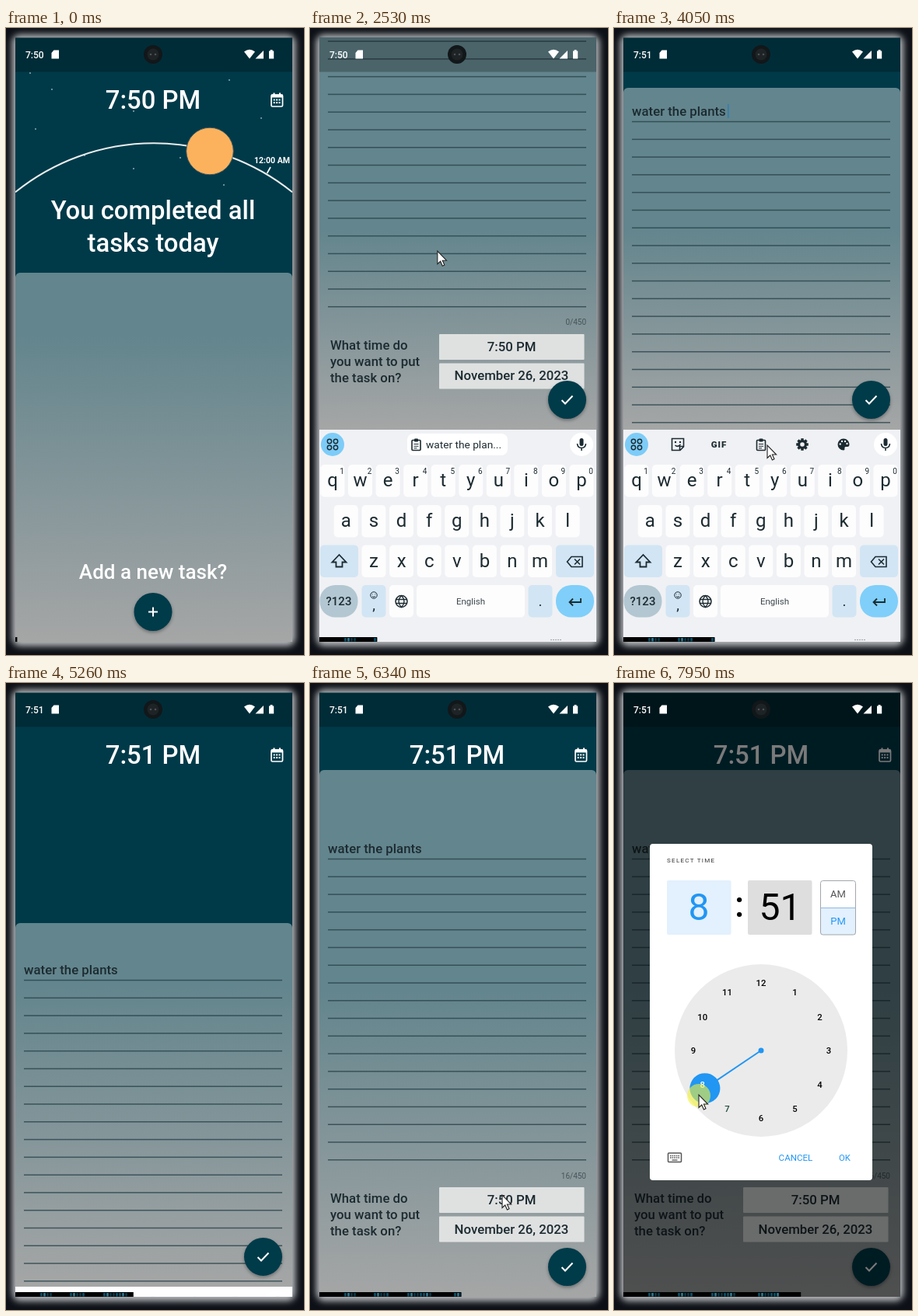
Animation, 383 px wide and 807 px high, one loop 8 s. Source, as an HTML page:

```html
<!DOCTYPE html>
<html lang="en">
<head>
<meta charset="utf-8">
<title>Task app</title>
<style>
html, body { margin: 0; width: 100%; height: 100%; overflow: hidden; background: #0d1117; }
svg { display: block; width: 383px; height: 807px; font-family: Roboto, sans-serif; }
</style>
</head>
<body>
<svg id="stage" viewBox="0 0 383 807"></svg>
<script>
const LOOP = 8000, BOTTOM = 790, ROW = 22.78;
const NAVY = '#003a49', INK = '#1c2b31', BLUE = '#2196f3';

// Markup helpers
const text = (x, y, size, str, attr = '') => `<text x="${x}" y="${y}" font-size="${size}" ${attr}>${str}</text>`;
const mid = (x, y, size, str, attr = '') => text(x, y, size, str, 'text-anchor="middle" ' + attr);
const rect = (x, y, w, h, fill, r = 0, attr = '') =>
  `<rect x="${x}" y="${y}" width="${w}" height="${h}" rx="${r}" fill="${fill}" ${attr}/>`;
const circle = (x, y, r, fill, attr = '') => `<circle cx="${x}" cy="${y}" r="${r}" fill="${fill}" ${attr}/>`;
const path = (d, attr = '') => `<path d="${d}" ${attr}/>`;
const group = (id, body, attr = '') => `<g id="${id}" ${attr}>${body}</g>`;
const at = (x, y, body, attr = '') => `<g transform="translate(${x} ${y})" ${attr}>${body}</g>`;
const line = (w, color = INK) => `fill="none" stroke="${color}" stroke-width="${w}"`;
const range = n => [...Array(n).keys()];

function calendar() {
  const cells = range(6).map(i => rect(343.7 + (i % 3) * 3.4, 91.5 + (i > 2) * 3.6, 2, 2, '#fff')).join('');
  return rect(341, 86, 14.5, 15, 'none', 1.5, 'stroke="#fff" stroke-width="1.7"') +
    rect(341, 85.5, 14.5, 4, '#fff') + rect(343.5, 83.5, 2, 3, '#fff') + rect(351, 83.5, 2, 3, '#fff') + cells;
}

function sky() {
  const stars = [[31, 58], [59, 79], [287, 67], [38, 130], [328, 116], [101, 164], [164, 181], [224, 167], [280, 202], [164, 107]];
  return stars.map(([x, y]) => circle(x, y, 0.9, '#9fb6bd')).join('') +
    path('M12 211.3A283 283 0 0 1 368 211.3', line(2, '#e9eded')) +
    path('M340 179L335.5 187', line(1.6, '#fff')) +
    circle(262, 158.5, 30.3, '#fcb25c', 'stroke="#3c5560" stroke-width="1"') +
    mid(342, 174, 10.5, '12:00 AM', 'font-weight="600"') +
    mid(189, 246, 32.8, 'You completed all') + mid(189, 288, 32.8, 'tasks today');
}

function form() {
  const rules = range(18).map(i => rect(23, i * ROW - 0.2, 332, 1.5, '#29434a', 0, 'opacity=".8"')).join('');
  const label = ['What time do', 'you want to put', 'the task on?']
    .map((s, i) => text(26, 443 + i * 21, 16.8, s)).join('');
  return rules + text(23, -7.4, 16.8, '', 'id="task"') + rect(146, -22, 1.5, 18, '#2f7fb5', 0, 'id="caret"') +
    text(355, 411.5, 10, '', 'id="count" text-anchor="end" fill="#46545a" font-weight="400"') + label +
    rect(166, 423, 186.5, 33, '#dfe1e1', 1) + rect(166, 460.5, 186.5, 33, '#dfe1e1', 1) +
    mid(259, 445, 16.8, '7:50 PM') + mid(259, 482.5, 16.8, 'November 26, 2023');
}

const clipboard = (x, y) => at(x, y,
  rect(-5.5, -6, 11, 13, 'none', 1, `stroke="${INK}" stroke-width="1.6"`) + rect(-2.5, -8, 5, 4, INK, 1) +
  path('M-3-1h6M-3 1.7h6M-3 4.3h4', line(1.1)));

function tools() {
  const teeth = range(8).map(i => `<rect x="-1.7" y="-7.8" width="3.4" height="4" fill="${INK}" transform="rotate(${i * 45})"/>`).join('');
  return at(82, 536, path('M-7.5-7.5h15V3L3 7.5H-7.5zM7 2.5H2.5V7M-3.5 1Q0 4 3.5 0', line(1.6)) +
      circle(-3, -3, 1.2, INK) + circle(3, -3, 1.2, INK)) +
    mid(135, 540, 11.5, 'GIF', 'font-weight="900" letter-spacing="1"') + clipboard(189, 536.5) +
    at(242, 536, teeth + circle(0, 0, 4.4, 'none', `stroke="${INK}" stroke-width="3.2"`)) +
    at(295, 536, path('M0-7.5A7.5 7.5 0 1 0 0 7.5C3 7 0 4 2.5 3H5C7 3 7.5 1.5 7.5 0 7.5-4 4-7.5 0-7.5z') +
      [[-4.3, -0.5], [-2, -4], [2, -4], [4.5, -1]].map(([x, y]) => circle(x, y, 1.2, '#f0f1f4')).join(''));
}

function keyboard() {
  const key = (x, y, w, fill = '#fdfdfe', r = 5) => rect(x - w / 2, y, w, 41.5, fill, r);
  const letters = (row, x0, y, step) => [...row].map((c, i) =>
    key(x0 + i * step, y, 31) + mid(x0 + i * step, y + 28, 24, c)).join('');
  const digits = [...'1234567890'].map((d, i) => mid(41 + i * 35.55, 574, 10, d)).join('');
  const dots = [[-4, -4], [4, -4], [-4, 4], [4, 4]].map(([x, y]) => circle(29 + x, 536 + y, 2.7, 'none', `stroke="${INK}" stroke-width="1.4"`)).join('');
  return rect(12, 517, 356, 273, '#f0f1f4') +
    circle(29, 536, 15, '#7dccf8') + dots + circle(349, 536, 15, '#fff') +
    at(349, 536, rect(-2.5, -8, 5, 10, INK, 2.5) + path('M-5.5-1Q-5 4.5 0 4.5T5.5-1M0 4V8', line(1.6))) +
    group('chip', rect(125, 522, 129, 28, '#fff', 8) + clipboard(136.5, 536.5) + text(149, 541, 13.7, 'water the plan...')) +
    group('tools', tools()) +
    letters('qwertyuiop', 29, 562, 35.55) + digits + letters('asdfghjkl', 46.3, 614, 35.6) + letters('zxcvbnm', 82, 665.5, 35.6) +
    key(37.5, 665.5, 49, '#d2e5f4') + path('M37.5 678l-9 9.5h5v6h8v-6h5z', line(1.8)) +
    key(340.5, 665.5, 49, '#d2e5f4') + path('M330.5 687l5.5-6.5h14v13h-14zM340 683.5l7 7M347 683.5l-7 7', line(1.6)) +
    key(37, 717, 49, '#b2c7d2', 20) + mid(37, 743, 15, '?123', 'font-weight="500"') +
    key(82, 717, 31, '#d2e5f4') + mid(82, 749, 19, ',') + circle(82, 730, 4.2, 'none', `stroke="${INK}"`) + path('M80 731.5q2 2 4 0M80.3 728.5v.8M83.7 728.5v.8', line(1)) +
    key(117.5, 717, 31) + at(117.5, 738, circle(0, 0, 7.5, 'none', `stroke="${INK}" stroke-width="1.5"`) +
      path('M-7-2.5H7M-7 2.5H7M0-7.5Q-7 0 0 7.5Q7 0 0-7.5', line(1.3))) +
    key(206.5, 717, 139) + mid(206.5, 742, 11.5, 'English', 'fill="#3d474c"') +
    key(296, 717, 31, '#d2e5f4') + mid(296, 744, 19, '.') +
    key(340.5, 717, 49, '#7fcffa', 20) + path('M348 734v5h-14M338 734.5l-4.5 4.5 4.5 4.5', line(1.8)) +
    range(5).map(i => circle(310 + i * 3, 787.5, 0.8, '#888f94')).join('');
}

function status() {
  return text(25, 38.5, 12, '', 'id="clock" font-weight="500"') +
    path('M61.5 28.5H68V39.5H58.5V32z') +
    path('M313 39.5L306 30.5Q313 25 320 30.5z'.replace('313 39.5', '313 39.5')) + path('M331 29V39.5H320.5z') +
    path('M338 29.5h1.7v-1.5h2.8v1.5h1.7V39.5H338z');
}

function dialog() {
  const hours = range(12).map(i => {
    const a = (i + 1) * Math.PI / 6;
    return mid(189 + 87 * Math.sin(a), 477 - 87 * Math.cos(a), 11.3, i + 1, `id="h${i + 1}" font-weight="500"`);
  }).join('');
  return rect(46, 207, 286, 433, '#fff', 4) +
    text(68, 231, 8, 'SELECT TIME', 'letter-spacing="1.3" fill="#333"') +
    rect(68, 254, 82.5, 70, '#e3f0fd', 2) + rect(172, 254, 82.5, 70, '#dedede', 2) +
    mid(109, 305, 48, '', `id="hour" fill="${BLUE}"`) + mid(161, 301, 46, ':', 'font-weight="500"') + mid(213.5, 305, 48, '51') +
    path('M265.5 289.5h45V324h-45z', 'fill="#e3f0fd"') +
    rect(265.5, 254.5, 45, 69.5, 'none', 3, 'stroke="#a2a7ab"') + path('M265.5 289.5h45', line(1, '#8db9df')) +
    mid(288, 276, 13, 'AM', 'fill="#555"') + mid(288, 311, 13, 'PM', `fill="${BLUE}"`) +
    circle(189, 473, 111, '#ebebeb') +
    group('hand', path('M189 473V386', line(2, BLUE)) + circle(189, 386, 19.5, BLUE)) + circle(189, 473, 3.5, BLUE) + hours +
    rect(69.5, 605, 17, 11.5, 'none', 1, 'stroke="#555" stroke-width="1.5"') +
    path('M72 608.5h12M72 611h12', line(1.5, '#555') + ' stroke-dasharray="1.6 1"') + path('M74.5 614h7', line(1.3, '#555')) +
    mid(233.5, 615, 11.6, 'CANCEL', `fill="${BLUE}"`) + mid(296.5, 615, 11.3, 'OK', `fill="${BLUE}"`);
}

function progress() {
  const bits = [[44, 16], [82, 20], [125, 32], [185, 28]].map(([x, w]) =>
    range(w / 4).map(i => rect(x + i * 4, 785, 3, 4.5, ['#0c4a5e', '#0a3341', '#2b6e82'][i * 7 % 5 % 3])).join('')).join('');
  return rect(12, 784, 240, 6, '#000') + bits;
}

const stage = document.getElementById('stage');
stage.innerHTML = `<defs>
  <filter id="blur" x="-20%" y="-20%" width="140%" height="140%"><feGaussianBlur stdDeviation="4.5"/></filter>
  <filter id="drop" x="-30%" y="-30%" width="160%" height="160%"><feDropShadow dx="0" dy="2" stdDeviation="2" flood-opacity=".35"/></filter>
  <linearGradient id="fade" gradientUnits="userSpaceOnUse" x1="0" x2="0">
    <stop offset="0" stop-color="#63858d"/><stop offset="1" stop-color="#a5a6a6"/></linearGradient>
  <clipPath id="screen">${rect(12, 12.5, 356, 777.5, '#000')}</clipPath>
  <clipPath id="played">${rect(12, 780, 0, 12, '#000', 0, 'id="bar"')}</clipPath>
</defs>` +
  rect(0, 0, 383, 807, '#0d1117') + rect(8, 8.5, 364, 787, '#e4e6e8', 10, 'filter="url(#blur)" opacity=".8"') +
  group('phone',
    rect(12, 12, 356, 780, NAVY) +
    group('header', group('sky', sky()) + mid(189, 104, 32.8, '', 'id="title"') + calendar(), 'fill="#fff" font-weight="500"') +
    rect(12, 0, 356, 1000, 'url(#fade)', 6, 'id="sheet"') +
    group('prompt', mid(189, 709, 26, 'Add a new task?'), 'fill="#fff" font-weight="500"') +
    group('form', form(), `fill="${INK}" font-weight="500"`) +
    group('fab', circle(0, 0, 24.5, NAVY, 'filter="url(#drop)"') +
      path('M-6 0H6M0-6V6', 'id="plus" ' + line(2, '#fff')) + path('M-7 .5L-2.5 5 7-5', 'id="check" ' + line(2, '#fff'))) +
    group('keys', rect(12, 517, 356, 273, '#fff') + group('panel', keyboard()), `fill="${INK}"`) +
    rect(12, 12, 356, 44.5, '#000', 0, 'opacity=".25"') +
    rect(12, 12, 356, 780, '#000', 0, 'id="shade"') +
    circle(189, 34, 12, '#12171a') + circle(189, 34, 7.5, '#1e2326') + circle(186, 34, 1.3, '#4a5054') + circle(192, 34, 1.3, '#4a5054') +
    group('status', status(), 'fill="#fff"') +
    group('dialog', dialog()) +
    group('progress', progress(), 'clip-path="url(#played)"') +
    group('pointer', circle(0, 1, 15, '#f4f23c', 'id="halo" opacity=".6"') +
      path('M0 0V16.5L3.8 13 6.4 19 9 17.8 6.4 12H11.6z', 'fill="#fff" stroke="#222" stroke-width="1.1"')),
    'clip-path="url(#screen)"');

const el = {};
stage.querySelectorAll('[id]').forEach(e => el[e.id] = e);
const set = (id, attrs) => { for (const k in attrs) el[id].setAttribute(k, attrs[k]); };
const write = (id, s) => { if (el[id].textContent !== s) el[id].textContent = s; };
const show = (id, on) => set(id, { opacity: +on });
const move = (id, x, y) => set(id, { transform: `translate(${x} ${y})` });
const clamp = u => Math.min(1, Math.max(0, u));

// Eased value at t from points [time, value]
function track(t, points) {
  if (t <= points[0][0]) return points[0][1];
  for (let i = 1; i < points.length; i++) {
    const [t0, a] = points[i - 1], [t1, b] = points[i];
    if (t < t1) {
      const u = (t - t0) / (t1 - t0);
      return a + (b - a) * u * u * (3 - 2 * u);
    }
  }
  return points[points.length - 1][1];
}

const TOP = [[950, 315], [1450, 112], [2250, 112], [2550, -146], [3180, -146], [3390, 77], [5110, 77], [5250, 309], [5330, 309], [5750, 112]];
const GAP = [[950, 72], [1450, 114], [3180, 114], [3390, 43], [5110, 43], [5250, 73], [5330, 73], [5750, 114]];
const KEYS = [[2250, 0], [2500, 273], [5090, 273], [5287, 0]];
const POINTER = [[0, 258, 830], [200, 258, 792], [750, 192, 752], [1150, 192, 752], [1730, 217, 615], [2080, 150, 212],
  [2300, 150, 212], [2990, 203, 500], [3100, 195, 535], [3500, 195, 535], [4050, 197, 537], [4320, 197, 537],
  [4950, 385, 480], [5550, 385, 690], [6200, 247, 659], [6500, 247, 659], [7600, 109, 530]];
const CLICKS = [820, 2140, 3110, 6390, 7820];

function draw(t) {
  const top = track(t, TOP), keys = track(t, KEYS), bottom = BOTTOM - keys;
  const clock = t < 3600 ? '7:50' : '7:51', typed = t >= 3180;
  const home = track(t, [[950, 1], [1150, 0]]), open = track(t, [[6420, 0], [6620, 1]]);

  write('clock', clock);
  write('title', clock + ' PM');
  show('sky', home);
  show('prompt', home);
  set('sheet', { y: top });
  set('fade', { y1: bottom * 0.5, y2: bottom });

  move('form', 0, top + track(t, GAP));
  show('form', track(t, [[1100, 0], [1400, 1]]));
  write('task', typed ? 'water the plants' : 'Type your task here');
  set('task', { fill: typed ? INK : '#3a535b' });
  write('count', typed ? '16/450' : '0/450');
  show('caret', typed && t < 5100 && t % 1000 < 500);

  move('fab', track(t, [[950, 189], [1400, 330.5]]), 751.5 - keys);
  show('plus', t < 1150);
  show('check', t >= 1150);
  move('keys', 0, 273 - keys);
  show('panel', clamp((keys - 12) / 40));
  show('chip', t < 3500);
  show('tools', t >= 3500);

  set('shade', { opacity: open * 0.52 });
  show('dialog', open);
  const picked = t >= 7820;
  write('hour', picked ? '8' : '7');
  set('h7', { fill: picked ? '#1d4a3c' : '#fff' });
  set('h8', { fill: picked ? '#fff' : '#000' });
  set('hand', { transform: `rotate(${track(t, [[7820, 210], [7990, 240]])} 189 473)` });

  set('bar', { width: 2.4 + t * 0.0284 });
  move('pointer', track(t, POINTER.map(p => [p[0], p[1]])), track(t, POINTER.map(p => [p[0], p[2]])));
  set('halo', { opacity: CLICKS.some(c => t >= c && t < c + 200) ? 0.6 : 0 });
}

const start = performance.now();
function tick() {
  draw((performance.now() - start) % LOOP);
  requestAnimationFrame(tick);
}
tick();
</script>
</body>
</html>
```
